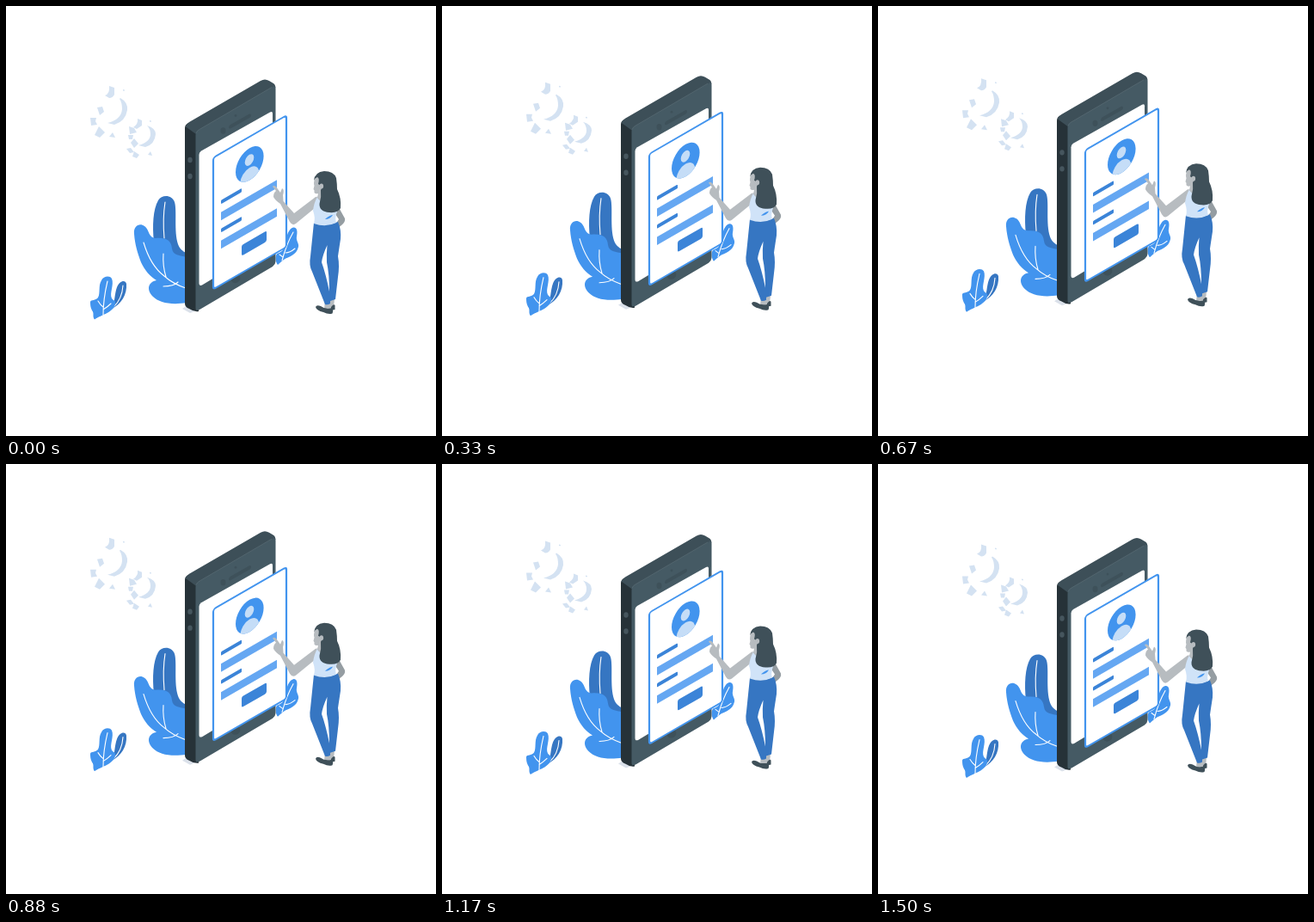
An HTML page for the animation above (1.54 s loop, 500 by 500 pixels).

```html
<!DOCTYPE html>
<html lang="en">
<head>
<meta charset="utf-8">
<title>Floating sign-in form</title>
<style>
  html, body { margin: 0; width: 100%; height: 100%; overflow: hidden; background: #fff; }
  svg { display: block; width: 100%; height: 100%; }
  .sky { fill: #4294ee; }
  .deep { fill: #3676c2; }
  .pale { fill: #d4e2f2; }
  .skin { fill: #b7bcc0; }
  .hair { fill: #3f5059; }
  .vein { fill: none; stroke: #fff; stroke-width: 1.1; stroke-linecap: round; }
</style>
</head>
<body>
<svg viewBox="0 0 500 500">
  <g id="scene">
    <!-- gears -->
    <g class="pale">
      <path d="M120 93L126 95V103Q124 107 120 107L115 104Q121 102 120 93Z"/>
      <path d="M136 97l2 .5-.5 1.500-1.500-.5Z"/>
      <path d="M133 107Q142 112 141 121Q139 134 126 138L118 136Q134 132 135 120Q135 112 132 108Z"/>
      <path d="M106 118L112 117L114 123L109 127Z"/>
      <path d="M98 130L105 130L104 134L106 138L99 139Z"/>
      <path d="M108 140L115 147L109 153L103 150Z"/>
      <path d="M124 147L127 153L120 152Z"/>
      <path d="M153 131L158 133V139L152 143L148 141Q154 137 153 131Z"/>
      <path d="M167 133l2 .5-.5 1.500-1.500-.5Z"/>
      <path d="M164 139Q174 142 174 149Q173 161 162 164L154 162Q168 158 168 149Q168 143 164 139Z"/>
      <path d="M143 140L149 142L152 147L144 149Z"/>
      <path d="M142 150L148 150L147 155L143 155Z"/>
      <path d="M149 154L154 160L149 165L145 159Z"/>
      <path d="M140 166L145 165L149 170L144 171Z"/>
      <path d="M149 169L155 173L152 177L147 175Z"/>
      <path d="M168 169L170 174L165 173Z"/>
    </g>

    <!-- plants -->
    <path class="deep" d="M172 274C170 256 171 236 177 226C181 219 193 219 196 228C199 238 195 262 200 277C202 283 206 285 209 287V300H190Z"/>
    <path class="vein" d="M185 228Q182 247 184 270"/>
    <path class="sky" d="M149 265C148 255 156 252 161 256C167 260 165 269 174 270C187 269 192 273 193 282C194 290 202 290 210 292V345C192 348 178 345 171 338C163 330 165 321 175 319C168 315 161 307 157 298C153 287 150 278 149 265Z"/>
    <path class="vein" d="M160 275Q168 302 184 314Q194 323 209 328M183 288Q182 302 186 315M183 326Q195 326 200 321"/>

    <path class="deep" d="M123 352C127 344 126 335 129 327C132 319 139 318 140 323C141 335 134 347 123 352Z"/>
    <path class="vein" d="M136 325Q135 341 125 350"/>
    <path class="sky" d="M103 364.500C100 361 103 357 100 354C98 350 98 347 98 344C99 341 104 343 107 339C110 334 107 325 111 319C113 314 121 313 123 317C126 324 120 334 123 340C125 343 128 342 127 346C126 356 111 359 103 364.500Z"/>
    <path class="vein" d="M118 320Q113 341 113 359M107 343Q110 348 113 350M122 346Q118 350 113 353"/>

    <path class="sky" d="M316 301C313 297 313 291 315 288C319 287 324 284 325 276C326 266 329 259 334 257.500C339 257 339 263 338 268C337 273 341 276 340 280C338 290 329 291 323 295Q319 298 316 301Z"/>
    <path class="vein" d="M334 263Q326 277 321 296M336 282Q330 287 325 287M318 289L322 292"/>

    <!-- phone -->
    <path fill="#dbe1ea" d="M205 352L211 348L222 354L214 357Z"/>
    <path fill="#263238" d="M208 142Q208 138 212 136L224 144V355Q219 356 213 352Q208 350 208 346Z"/>
    <path fill="#3d4f58" d="M208.500 140Q210 137 213 135L296 87Q301 84 306 87L311 90Q313 91 313.500 95L224 147Q220 147 221 149Z"/>
    <path fill="#455a64" d="M220.500 150Q220.500 146 224 144L309 94.500Q313.500 92 313.500 96V297Q313.500 300 310 303L226 352.500Q220.500 356 220.500 351Z"/>
    <path fill="none" stroke="#596c75" stroke-width=".7" d="M221 148Q222 145 225 143.500L309 94.500"/>
    <g fill="#46565e">
      <ellipse cx="214" cy="179" rx="2.700" ry="3.200"/>
      <ellipse cx="214" cy="198" rx="2.700" ry="3.200"/>
    </g>
    <g fill="#3e515a">
      <ellipse cx="252.500" cy="145" rx="3" ry="3.700"/>
      <circle cx="267" cy="127.500" r="1.400"/>
      <path d="M261 138L283 125.500Q285 125 285 127Q285 129 283 130L261 142.500Q259 143 259 141Q259.500 139 261 138Z"/>
      <ellipse cx="267" cy="317" rx="5.500" ry="5" transform="rotate(-30 267 317)"/>
    </g>
    <path fill="#fff" d="M224.500 173Q224.500 170 227 168.500L307 123.500Q310 122 310 125V275L228 324.500Q224.500 326 224.500 322Z"/>

    <!-- card, drawn flat then sheared onto the phone plane -->
    <g transform="matrix(1 -.577 0 1 241 176.300)">
      <rect width="85" height="153" rx="3" fill="#fff" stroke="#4294ee" stroke-width="2.200"/>
      <clipPath id="disc"><ellipse cx="42.300" cy="32" rx="16.300" ry="18.700"/></clipPath>
      <g clip-path="url(#disc)">
        <rect class="sky" x="25" y="10" width="35" height="43"/>
        <g fill="#c5ddf7">
          <ellipse cx="42" cy="27" rx="5.300" ry="6.200"/>
          <ellipse cx="42.300" cy="48.500" rx="11" ry="12.500"/>
        </g>
      </g>
      <g fill="#3b84d8">
        <rect x="9" y="54.600" width="24" height="4.500" rx="1"/>
        <rect x="9" y="87.600" width="24" height="4.500" rx="1"/>
        <rect x="33" y="120.800" width="29" height="12.500" rx="2"/>
      </g>
      <g fill="#65a7f2">
        <rect x="9" y="68.600" width="65" height="9.500"/>
        <rect x="9" y="101.600" width="65" height="9.500"/>
      </g>
    </g>

    <!-- woman -->
    <path fill="#959da2" d="M383 231Q387 233 389 238L394 247Q395 251 390 255L386 258L383 254L387 248L381 239Z"/>
    <path class="skin" d="M371 343L382 340L381 351L370 352Z"/>
    <path class="hair" d="M378 350Q381 346 382.500 348V353L378 354Z"/>
    <path class="hair" d="M360 350Q361 347 366 349Q371 353 379 351Q381 354 379.500 357.500Q375 359 369 356Q361 354 360 350Z"/>
    <path class="deep" d="M358 252Q373 257 386 251Q390 260 389 271Q387 284 386 291Q388 302 386 315L383 341L377 343V346Q374 348 371 347L356 309Q352 302 354 291Z"/>
    <path fill="#fff" d="M373.500 278Q368 290 367 298Q372 312 376 332Q376 312 373 298Q372.500 288 373.500 278Z"/>
    <path class="skin" d="M360 222Q365 221 366 227Q364 231 359 235L337 253Q333 256 330 251L319 230Q313 226 311 222Q311 217 314 215L310 210Q311 208 314 210L319 217L321 212Q324 213 322 220L322.500 227L335 241Z"/>
    <path fill="#d0e3f8" d="M362 222Q358 229 357 238Q360 246 358 253Q372 258 384 252Q382 247 385 239L384 231L368 219Z"/>
    <path fill="#4294ee" d="M372 247Q377 243 380 243Q377 248 371 248Z"/>
    <path class="skin" d="M360 198Q357 206 358.500 209L357.500 213Q359 214 358.500 217Q360 219 363 218L362 223Q366 229 371 226L372 200Z"/>
    <path class="hair" d="M358 203Q359 193 370 192Q381 192 384 200Q385 207 385 213Q390 223 389 235Q386 241 376 240Q364 239 364.500 230Q367 222 366 214L368 210L363 207Q365 200 362 199Q359 200 358 203Z"/>
    <ellipse class="skin" cx="366.800" cy="209.500" rx="2.300" ry="3"/>
  </g>
</svg>
<script>
  const LOOP = 1540, FPS = 24, STEPS = 37, RISE = 10, PHASE = 1.2;
  const scene = document.getElementById('scene');

  // Linear rise and fall, in pixels above the lowest point.
  function lift(n) {
    const p = ((n + PHASE) % STEPS) / STEPS;
    return RISE * (1 - Math.abs(1 - 2 * p));
  }

  function draw(now) {
    const n = Math.floor((now % LOOP + 5) * FPS / 1000) % STEPS;
    scene.setAttribute('transform', `translate(0 ${(lift(0) - lift(n)).toFixed(3)})`);
    requestAnimationFrame(draw);
  }
  draw(performance.now());
</script>
</body>
</html>
```
